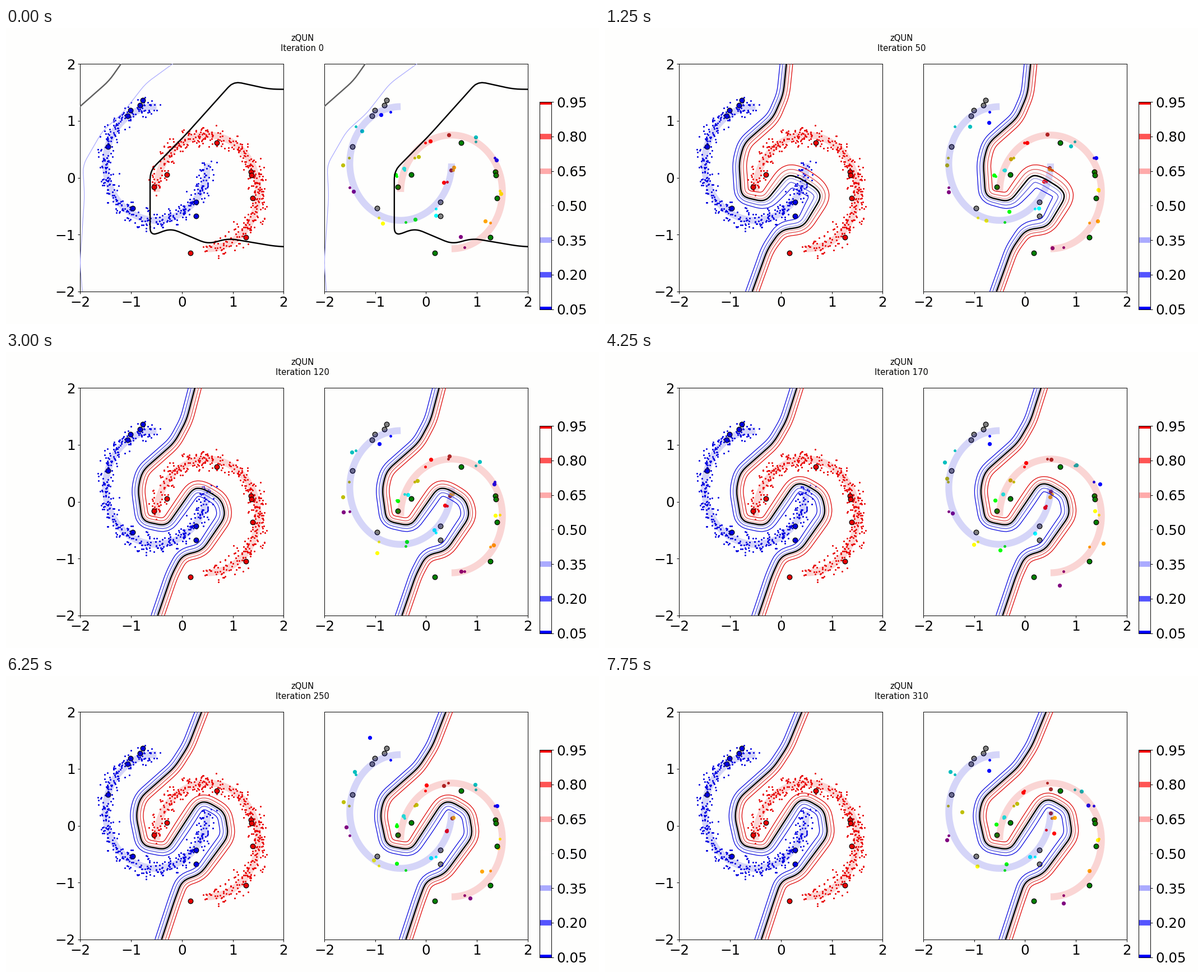
These frames come from a looping animation (1058 px wide and 529 px high, 8 s). A matplotlib script:

```python
import numpy as np
import matplotlib.pyplot as plt
from matplotlib.animation import FuncAnimation
from matplotlib.path import Path

FRAMES, INTERVAL, STEP = 32, 250, 10
PAPER, BLUE, RED = "#fefefd", "#0000e0", "#e80000"
CENTER, UNIT = np.array([313.7, 267.4]), np.array([90.77, -101.7])
LEVELS = np.linspace(0.05, 0.95, 7)
Z_LEVELS = [-1, -0.56, -0.24, 0.24, 0.56, 1]
LEVEL_COLORS = plt.cm.bwr(np.linspace(0, 1, 7))
LINE_COLORS = np.delete(LEVEL_COLORS, 3, axis=0) * [0.87, 0.87, 0.87, 1]

plt.rcParams.update({
    "font.family": "DejaVu Sans",
    "xtick.labelsize": 20,
    "ytick.labelsize": 20,
    "figure.facecolor": PAPER,
    "axes.facecolor": PAPER,
})

# Corners of the decision boundary, top end to bottom end, in stage pixels.
START = [(700, 112), (470, 109), (406, 95), (320, 191), (257, 255), (257, 372),
         (294, 358), (360, 386), (397, 376), (480, 390), (700, 400)]
EARLY = [(326, 40), (318, 118), (300, 160), (248, 206), (239, 240),
         (243, 301), (286, 311), (325, 262), (344, 266), (378, 287),
         (386, 302), (354, 355), (314, 361), (290, 395), (254, 495)]
LATE = [(361, 40), (326, 125), (301, 163), (238, 219), (231, 250),
        (243, 303), (287, 311), (343, 224), (359, 220), (391, 239),
        (398, 284), (346, 354), (314, 366), (302, 400), (271, 495)]
FAINT = [(297, 64), (249, 99), (208, 152), (172, 184), (137, 245), (140, 300),
         (132, 420), (136, 471)]
CORNER = [(132, 140), (184, 94), (205, 64)]

LABELED_BLUE = [(243.5, 129), (239, 138), (222, 147), (217, 157),
                (182, 212), (226, 322), (339, 311), (339, 335.5)]
LABELED_RED = [(376, 205), (287, 261.5), (263.5, 283.5), (437, 257),
               (438, 262.5), (440, 304), (428, 374), (329, 401.5)]

side = np.linspace(-2, 2, 121)
GX, GY = np.meshgrid(CENTER[0] + UNIT[0] * side, CENTER[1] + UNIT[1] * side)
GRID = np.column_stack([GX.ravel(), GY.ravel()])


def to_data(px):
    """Stage pixels in the left panel -> data units."""
    return (np.asarray(px, float) - CENTER) / UNIT


def round_corners(points, radius=14):
    p = np.asarray(points, float)
    t = np.linspace(0, 1, 5)[:, None]
    out = [p[:1]]
    for a, b, c in zip(p, p[1:], p[2:]):
        ends = []
        for q in (a, c):
            length = np.hypot(*(q - b))
            ends.append(b + (q - b) * min(radius / length, 0.45))
        out.append((1 - t) ** 2 * ends[0] + 2 * t * (1 - t) * b + t ** 2 * ends[1])
    return np.vstack(out + [p[-1:]])


def signed_distance(points):
    """Distance in pixels to the boundary, positive on the red side."""
    curve = round_corners(points)
    best = np.full(len(GRID), np.inf)
    for a, b in zip(curve[:-1], curve[1:]):
        v = b - a
        t = np.clip((GRID - a) @ v / (v @ v), 0, 1)
        best = np.minimum(best, ((GRID - a - t[:, None] * v) ** 2).sum(1))
    outline = np.vstack([curve, [(700, 495), (700, 40)]])
    sign = np.where(Path(outline).contains_points(GRID), 1, -1)
    return (sign * np.sqrt(best)).reshape(GX.shape)


START_FIELD = signed_distance(START)
BUMP = np.exp(-((GX - 345) ** 2 + (GY - 275) ** 2) / 70 ** 2)


def field(it):
    """Classifier output: the opening field collapses, then the spiral settles."""
    settle = np.clip((it - 50) / 230, 0, 1) ** 0.6
    d = signed_distance((1 - settle) * np.array(EARLY) + settle * np.array(LATE))
    width = 11.3 + np.interp(it, [50, 120], [10, 3]) * BUMP
    t = min(it / 50, 1) ** 0.7
    if t < 1:
        d = (1 - t) * START_FIELD + t * d
        width = width * 180 ** (1 - t)
    return d / width


FIELDS = [field(STEP * k) for k in range(FRAMES)]


def arc(center, degrees):
    a = np.radians(degrees)
    return np.column_stack([np.cos(a), np.sin(a)]) + center


MOONS = [((-0.5, 0.25), (90, 360), BLUE), ((0.5, -0.25), (180, -90), RED)]
k10 = np.arange(10)
PROBES = np.vstack([
    arc(MOONS[0][0], np.minimum(107 + 33 * k10, 355)),
    arc(MOONS[1][0], 170 - 13 * k10 - 1.6 * k10 ** 2),
])
PROBE_COLORS = ("blue c y purple yellow lime cyan red brown orange "
                "lime cyan y red brown c blue yellow orange purple").split()
REACH = np.r_[np.linspace(20, 3, 10), np.linspace(3, 15, 10)]


def dots(ax, pts, color, size, edge=0, z=3):
    return ax.plot(*np.transpose(pts), "o", ms=size, mfc=color, mec="black",
                   mew=edge, ls="", zorder=z)[0]


fig = plt.figure(figsize=(12, 6), dpi=529 / 6)
left, right = fig.subplots(
    1, 2, gridspec_kw=dict(left=0.125, right=0.88, bottom=0.11, top=0.8785, wspace=0.2))
title = fig.suptitle("", linespacing=1.27)
rng = np.random.default_rng(7)

opening = []
for ax in (left, right):
    ax.set(xlim=(-2, 2), ylim=(-2, 2), xticks=range(-2, 3), yticks=range(-2, 3))
    for center, span, color in MOONS:
        ax.plot(*arc(center, np.linspace(*span, 200)).T, color=color, lw=10,
                alpha=0.16, solid_capstyle="butt", zorder=5)
    opening += ax.plot(*to_data(round_corners(FAINT)).T,
                       color=LEVEL_COLORS[2], lw=1, zorder=6)
    opening += ax.plot(*to_data(round_corners(CORNER)).T,
                       color="#606060", lw=2, zorder=6)
right.set_yticks([])

for center, span, color in MOONS:
    pts = arc(center, rng.uniform(*sorted(span), 420))
    dots(left, pts + rng.normal(0, 0.09, pts.shape), color, 2.5, z=2)

for pts, color, muted in ((LABELED_BLUE, BLUE, "gray"), (LABELED_RED, RED, "green")):
    dots(left, to_data(pts), color, 7.1, 1)
    dots(right, to_data(pts), muted, 7.1, 1, z=4)

PROBES += rng.normal(0, 0.05, PROBES.shape)
movers = []
for p, color in zip(PROBES, PROBE_COLORS):
    dots(right, [p], color, 4)
    movers.append(dots(right, [p], color, 5.9))

bar = fig.add_axes([0.9, 0.05, 0.02, 0.7])
bar.set(xlim=(0, 1), ylim=(0.05, 0.95), xticks=[])
bar.yaxis.tick_right()
bar.set_yticks(LEVELS, [f"{v:.2f}" for v in LEVELS])
bar.hlines(LEVELS, 0, 1, colors=LEVEL_COLORS, lw=8)

contours = []


def update(k):
    title.set_text(f"zQUN\nIteration {STEP * k}")
    while contours:
        contours.pop().remove()
    z = FIELDS[k]
    for ax in (left, right):
        if k:
            contours.append(ax.contour(side, side, z, Z_LEVELS, colors=LINE_COLORS,
                                       linewidths=1, linestyles="solid", zorder=6))
        contours.append(ax.contour(side, side, z, [0], colors="black",
                                   linewidths=2, zorder=7))
    for line in opening:
        line.set_visible(k == 0)

    jitter = np.random.default_rng(100 + k).normal(0, 0.75, PROBES.shape)
    moved = PROBES + jitter * REACH[:, None] / UNIT
    for m, (x, y) in zip(movers, moved):
        m.set_data([x], [y])
    return []


anim = FuncAnimation(fig, update, frames=FRAMES, interval=INTERVAL,
                     init_func=lambda: update(0), repeat=True, repeat_delay=0)
plt.show()
```
